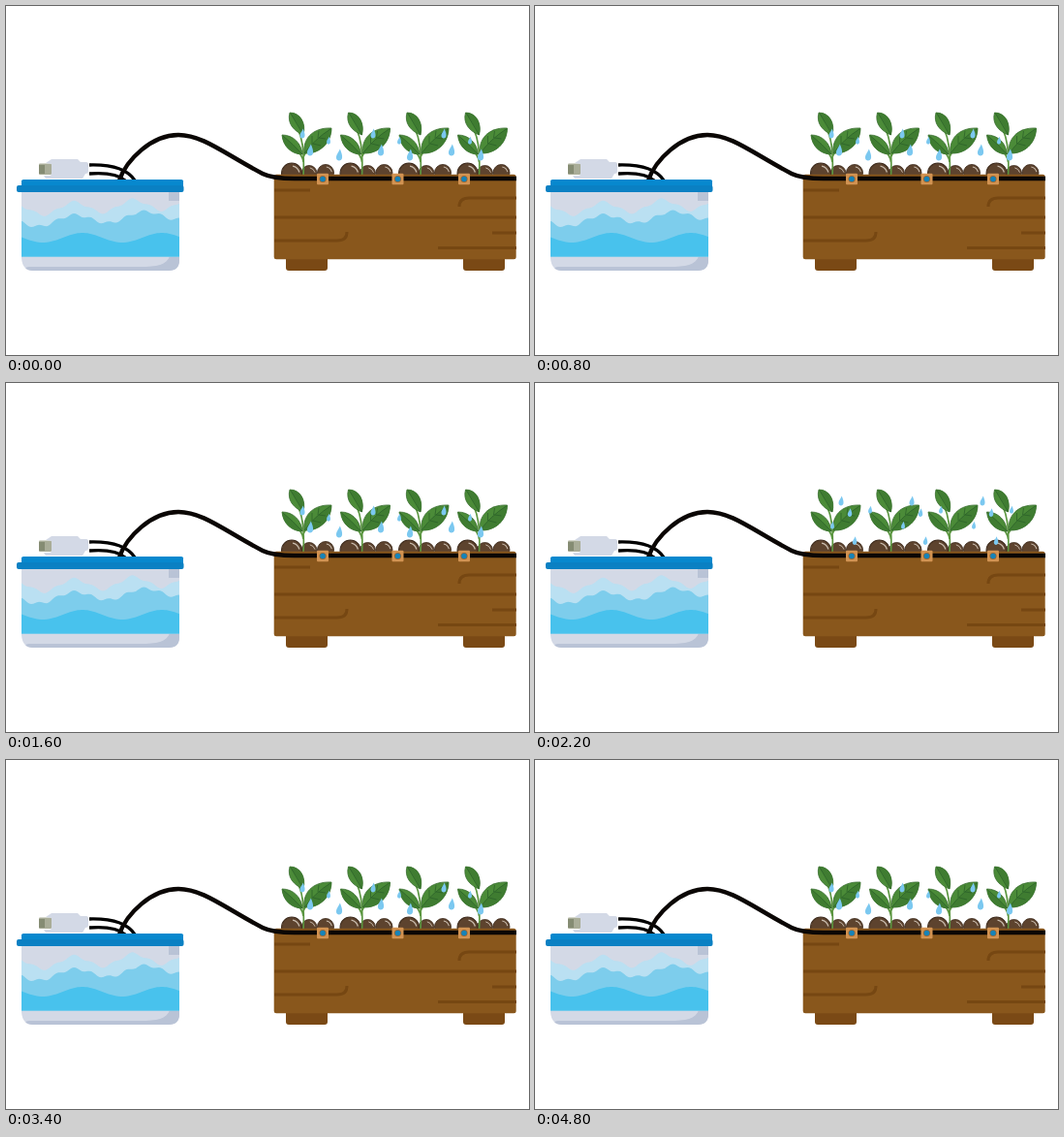
These frames come from a looping animation (540 by 360 pixels, 5 s). An HTML page:

```html
<!DOCTYPE html>
<html lang="en">
<head>
<meta charset="utf-8">
<title>Drip irrigation</title>
<style>
html, body { margin: 0; width: 100%; height: 100%; overflow: hidden; background: #fff; }
svg { display: block; width: 540px; height: 360px; }
</style>
</head>
<body>
<svg viewBox="0 0 540 360" fill="none">
  <defs>
    <g id="plant">
      <path d="M307 176Q308 156 306 143Q305 135 301 126M307 161Q306 153 299 148M307 156Q310 148 320 142" stroke="#5b9640" stroke-width="1.7"/>
      <g fill="#4b8b38" stroke="#356b2d" stroke-width=".8">
        <path d="M307 133C297 129 290 121 293 110C304 110 310 121 307 133Z"/>
        <path d="M306 153C295 153 286 145 285 133C297 133 305 142 306 153Z"/>
        <path d="M308 152C306 138 316 125 336 126C336 141 324 153 308 152Z"/>
      </g>
      <path d="M307 133Q301 121 293 110C304 110 310 121 307 133ZM306 153Q296 142 285 133C286 145 295 153 306 153ZM308 152Q319 137 336 126C336 141 324 153 308 152Z" fill="#3f7c31"/>
      <path d="M307 133L294 111M306 153Q296 142 286 134M308 152Q319 137 335 127M316 142V134M322 136L323 129M317 142L325 144M323 136L330 137" stroke="#2c632a" stroke-width=".8"/>
    </g>
    <g id="clod">
      <circle r="10" fill="#5d432e" stroke="#3e2b1d"/>
      <path d="M1-7Q6-6 7.500-1" stroke="#c9bcae" stroke-width="1.2"/>
    </g>
    <path id="drop" d="M.8-6C2.200-2.500 3-.2 2.800 2C2.500 6-2.700 6-2.800 2C-2.800-.5-.7-2.500.8-6Z"/>
    <g id="emitter">
      <rect x="-6" y="-5.700" width="12" height="11.400" rx="1" fill="#d29352"/>
      <circle r="3.600" fill="#9a6532"/>
      <circle r="2.800" fill="#1683b8"/>
    </g>
    <clipPath id="tank"><path d="M16 190H179V262Q179 273 168 273H28Q17 273 16 260Z"/></clipPath>
  </defs>

  <rect x="34" y="162.500" width="13" height="11.500" rx="1" fill="#a9ad98"/>
  <rect x="34" y="164" width="6" height="9" fill="#858c73"/>
  <path d="M41 162L47 158H74L77 161H83Q85 161 85 164V170Q85 173 82 173L79 178H41L39 175H45Q47 175 47 173V163Z" fill="#d3d9e6"/>
  <path d="M86 164Q122 163 133 180M86 173Q113 171 123 180" stroke="#000" stroke-width="3.300"/>

  <g clip-path="url(#tank)">
    <path d="M16 190H179V273H16Z" fill="#d3d9e6"/>
    <path d="M179 250V273H20Q19 269 24 269H138C156 269 166 267 169 258ZM168 191H179V201H168Z" fill="#b9c3d6"/>
    <g id="water"></g>
  </g>

  <g id="soil"></g>
  <g id="plants"></g>

  <path d="M289 260H332V270Q332 273 329 273H292Q289 273 289 270ZM472 260H515V270Q515 273 512 273H475Q472 273 472 270Z" fill="#7a4915"/>
  <rect x="276.700" y="173.700" width="250" height="87.600" rx="2.500" fill="#89571c"/>
  <path d="M277 190H314M277 218H527M277 242H342Q352 242 352 233M468 207Q468 198 478 198H527M502 234H527M446 249.500H527" stroke="#764712" stroke-width="3"/>
  <path d="M117 180C124 159 150 133 178 133C203 133 225 152 265 173Q275 178 298 178H527" stroke="#0b0705" stroke-width="4.400"/>
  <path d="M16 180.500Q16 179 18 179H181Q183 179 183 180.500V187H16Z" fill="#0788ce"/>
  <rect x="11" y="185" width="172.500" height="7" rx="2" fill="#0a80c3"/>
  <use href="#emitter" x="327" y="178.500"/>
  <use href="#emitter" x="404.500" y="178.500"/>
  <use href="#emitter" x="473" y="178.500"/>

  <g id="rainA" fill="#7bc8f0"></g>
  <g id="rainB" fill="#7bc8f0"></g>
</svg>
<script>
const $ = id => document.getElementById(id);
const repeat = (n, make) => Array.from({ length: n }, (_, i) => make(i)).join('');
const put = (name, x, y, scale = 1) =>
  `<use href="#${name}" transform="translate(${x} ${y}) scale(${scale})"/>`;

// A swell with its crest at the given x
const swell = (x, crest, period, height) =>
  height * Math.cos((x - crest) / period * 2 * Math.PI);

const layer = (fill, top) =>
  `<path fill="${fill}" d="M16 258.500${repeat(83, i => `L${16 + 2 * i} ${top(16 + 2 * i)}`)}V258.500Z"/>`;

$('water').innerHTML =
  layer('#bae0f2', x => 211 - x * .04 - swell(x, 70, 61, 6) - swell(x, 70, 20, 1.5)) +
  layer('#7dcdec', x => 224 - x * .05 - swell(x, 70, 72, 5) - swell(x, 70, 18, 1.5)) +
  layer('#48c2ed', x => 239 - swell(x, 79, 82, 5));

$('plants').innerHTML = repeat(4, i => put('plant', 60.5 * i, 0));
$('soil').innerHTML = repeat(4, i =>
  put('clod', 313 + 60.5 * i, 172.5, .8) +
  put('clod', 330 + 60.5 * i, 172, .85) +
  put('clod', 295 + 60.5 * i, 172.5, 1.05));

// One spray of drops per emitter
const spray = drops => repeat(3, i =>
  drops.map(([x, y, scale]) => put('drop', x + 73 * i, y, scale)).join(''));

$('rainA').innerHTML = spray([[306, 132, .9], [314, 149, 1.1], [333, 139, .7], [344, 154, 1.1]]);
$('rainB').innerHTML = spray([[316, 122, .9], [325, 134, .8], [330, 163, .8], [346, 131, .7], [307, 147, .7]]);

function draw(now) {
  const first = now % 5000 % 800 < 400;
  $('rainA').style.display = first ? '' : 'none';
  $('rainB').style.display = first ? 'none' : '';
  requestAnimationFrame(draw);
}
draw(performance.now());
</script>
</body>
</html>
```
